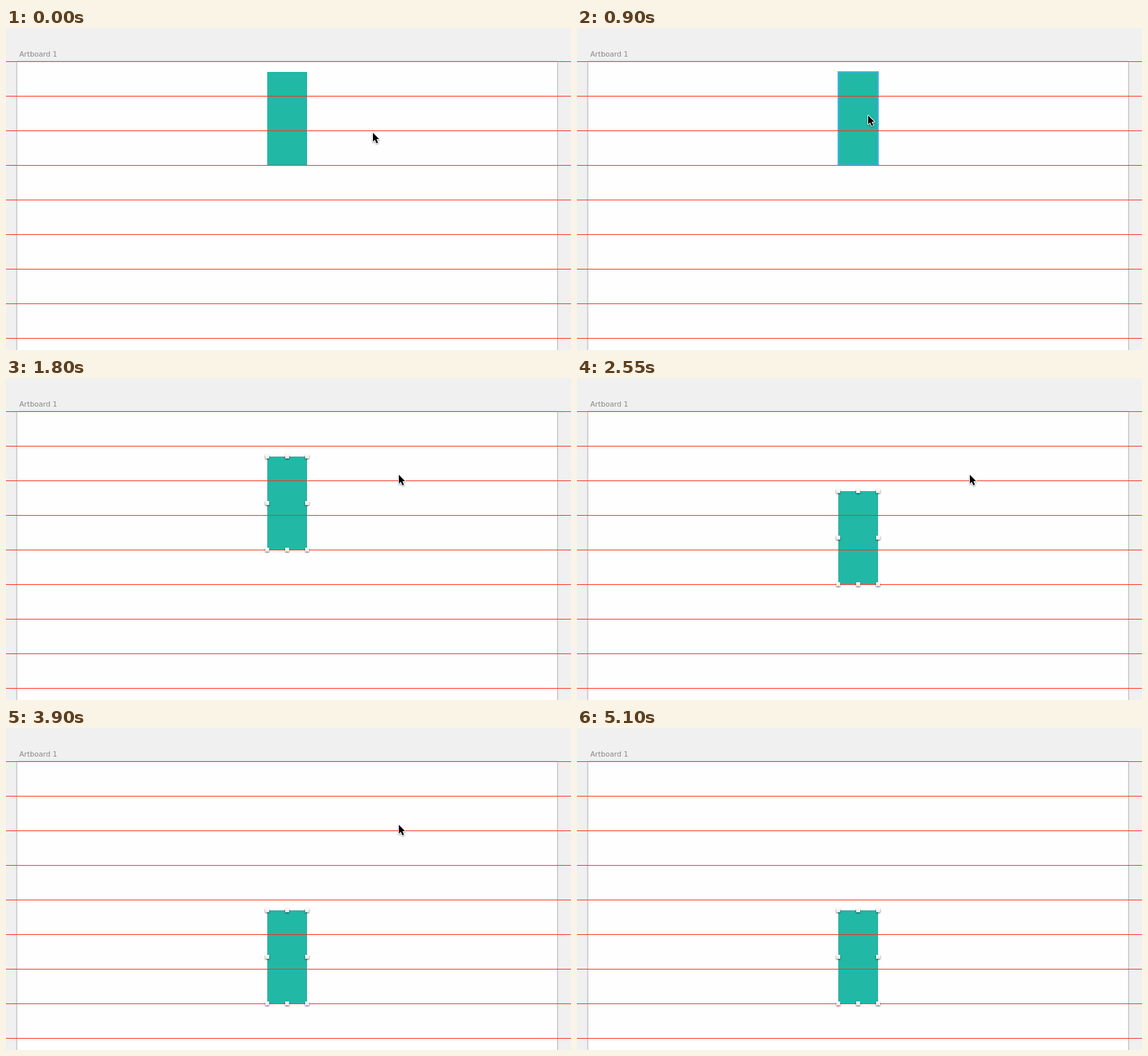
These frames come from a looping animation (850 px wide and 484 px high, 5.4 s). An HTML page:

```html
<!DOCTYPE html>
<html lang="en">
<head>
<meta charset="utf-8">
<title>Moving a block along grid lines</title>
<style>
html, body { margin: 0; width: 100%; height: 100%; overflow: hidden; background: #f0f0f0; }
svg { display: block; }
text { font: 10.7px "DejaVu Sans", sans-serif; fill: #858585; }
#board { fill: #fefefe; filter: drop-shadow(0 1px 1.5px rgba(0, 0, 0, .5)); }
#lines { stroke: #ff2b14; }
#hover { fill: none; stroke: #46b1ee; stroke-width: 2; }
#frame { fill: none; stroke: #7f9a98; stroke-opacity: .45; }
#handles rect { fill: url(#knob); filter: drop-shadow(0 1px 1px rgba(0, 0, 0, .65)); }
#cursor { filter: drop-shadow(0 1px 1px rgba(0, 0, 0, .4)); }
#cursor path { stroke: #fff; stroke-width: 2; paint-order: stroke; stroke-linejoin: round; }
</style>
</head>
<body>
<svg width="850" height="484" viewBox="0 0 850 484">
  <defs>
    <linearGradient id="knob" x2="0" y2="1">
      <stop offset="0" stop-color="#fff"/>
      <stop offset="1" stop-color="#e4e4e4"/>
    </linearGradient>
  </defs>
  <rect id="board" x="17" y="50" width="812" height="460"/>
  <text x="20" y="43">Artboard 1</text>
  <g class="block">
    <rect x="393" width="60" height="140" fill="#21b8a5"/>
    <rect id="hover" x="393" width="60" height="140"/>
  </g>
  <path id="lines"/>
  <g class="block" id="handles">
    <path id="frame" d="M393.5 .5h59v139h-59z"/>
  </g>
  <g id="cursor"><path d="M1 1.5V14.7L4 11.9L6.3 17.2L8.7 16.2L6.4 11H10.4Z"/></g>
</svg>
<script>
const LOOP = 5400, STEP = 52;
const $ = id => document.getElementById(id);
const show = (el, on) => el.setAttribute('visibility', on ? 'visible' : 'hidden');
const move = (el, x, y) => el.setAttribute('transform', `translate(${x} ${y})`);

// time, x, y of the pointer
const pointer = [
  [0, 551, 156], [600, 476, 138], [750, 444, 131], [900, 437, 130], [1200, 440, 130],
  [1350, 587, 143], [1500, 590, 144], [4800, 609, 179], [4950, 779, 435]
];
const nudges = [1800, 2550, 3150, 3900];

let grid = '';
for (let y = 50.5; y < 484; y += STEP) grid += `M0 ${y}H850`;
$('lines').setAttribute('d', grid);

for (const x of [393, 423, 453]) {
  for (const y of [0, 70, 140]) {
    if (x === 423 && y === 70) continue;
    const knob = document.createElementNS('http://www.w3.org/2000/svg', 'rect');
    const box = { x: x - 3, y: y - 3, width: 6, height: 6 };
    for (const key in box) knob.setAttribute(key, box[key]);
    $('handles').append(knob);
  }
}

function draw(now) {
  const t = now % LOOP;
  const [, x, y] = pointer.filter(p => p[0] <= t).pop();
  move($('cursor'), x, y);
  show($('cursor'), t < 5100);

  const top = 66 + STEP * nudges.filter(n => n <= t).length;
  document.querySelectorAll('.block').forEach(el => move(el, 0, top));
  show($('hover'), t >= 900 && t < 1200);
  show($('handles'), t >= 1200);
}

const start = performance.now();
function tick() {
  draw(performance.now() - start);
  requestAnimationFrame(tick);
}
tick();
</script>
</body>
</html>
```
